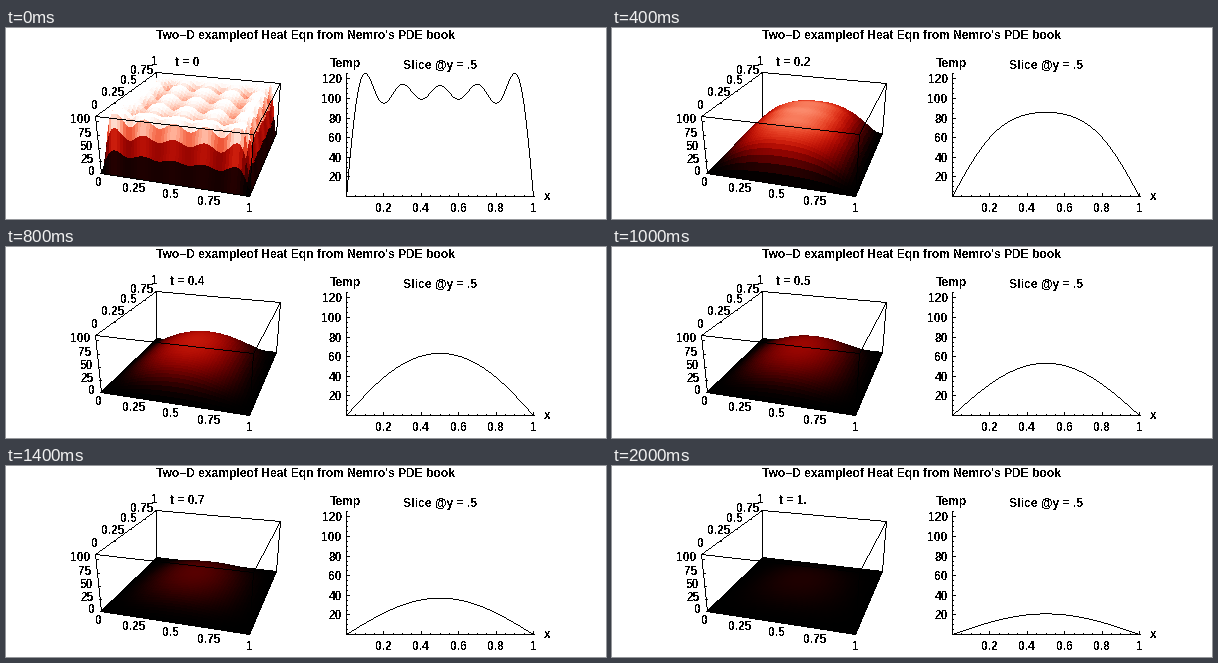
Write a matplotlib script that moves like this. It is 600 px wide and 191 px high and loops after 2100 ms.

```python
from itertools import combinations, product

import numpy as np
import matplotlib.pyplot as plt
from matplotlib.animation import FuncAnimation
from matplotlib.collections import PolyCollection

plt.rcParams.update({"font.family": "Liberation Sans", "font.weight": "bold",
                     "font.size": 8.64, "text.antialiased": False})

W, H, DPI = 600, 191, 100
FRAMES, INTERVAL = 21, 100
Z_TOP = 110
CELLS = 50

fig = plt.figure(figsize=(W / DPI, H / DPI), dpi=DPI, facecolor="white")
ax = fig.add_axes([0, 0, 1, 1])
ax.set_xlim(-0.5, W - 0.5)
ax.set_ylim(H - 0.5, -0.5)
ax.axis("off")


def label(x, y, s, ha="center"):
    return ax.text(x, y + 4, s, ha=ha, va="baseline")


def pixels(xs, ys):
    """Unit squares along a polyline, one per pixel step."""
    xs, ys = np.asarray(xs, float), np.asarray(ys, float)
    step = np.maximum(abs(np.diff(xs)), abs(np.diff(ys)))
    d = np.append(0, np.cumsum(step))
    s = np.linspace(0, d[-1], int(np.ceil(d[-1])) + 1)
    dots = np.floor(np.column_stack([np.interp(s, d, xs), np.interp(s, d, ys)]) + 0.5)
    square = np.array([(-0.5, -0.5), (0.5, -0.5), (0.5, 0.5), (-0.5, 0.5)])
    return dots[:, None] + square


def mesh(verts, z, **kw):
    return ax.add_collection(PolyCollection(verts, linewidths=0, zorder=z, **kw),
                             autolim=False)


def line(xs, ys, z=3):
    return mesh(pixels(xs, ys), z, facecolors="black")


# Temperature: truncated double sine series
odd = np.arange(1, 10, 2)


def series(s, decay):
    return (4 / (np.pi * odd) * decay) @ np.sin(np.pi * np.outer(odd, s))


def heat(x, y, t):
    return 100 * np.outer(series(y, np.exp(-odd * t)),
                          series(x, np.exp(-odd**2 * t)))


def heat_color(v):
    """Black through red and salmon to white for v in 0..1."""
    s = np.sin(np.pi / 2 * v)
    red = np.sin(np.pi / 2 * np.minimum(v / 0.85, 1)) ** 2
    return np.column_stack([red, s**10, s**14])


# Perspective fitted to the corners of the box, in binary order of x, y, z
corners = dict(zip(product((0, 1), repeat=3),
                   [(95, 145), (89, 88), (150, 91), (150, 44),
                    (243, 168), (247, 106), (270, 105), (274, 55)]))


def fit_camera():
    rows, rhs = [], []
    for p, (u, v) in corners.items():
        p = np.array([*p, 1])
        rows.append([*p, 0, 0, 0, 0, *(-u * p[:3])])
        rows.append([0, 0, 0, 0, *p, *(-v * p[:3])])
        rhs += [u, v]
    m = np.linalg.lstsq(np.array(rows, float), np.array(rhs, float), rcond=None)[0]
    return np.append(m, 1).reshape(3, 4)


camera = fit_camera()


def project(x, y, z):
    p = np.stack(np.broadcast_arrays(x, y, z, 1.0), axis=-1) @ camera.T
    return p[..., :2] / p[..., 2:]


# Box: edges meeting the hidden corner lie behind the surface
HIDDEN = (0, 1, 0)
for a, b in combinations(corners, 2):
    if sum(i != j for i, j in zip(a, b)) == 1:
        line(*zip(corners[a], corners[b]), 1 if HIDDEN in (a, b) else 3)

for s in np.linspace(0, 1, 5):
    u, v = project(s, 0, 0)
    label(u - 2 + 2 * s, v + 8 + 4 * s, f"{s:g}")
    u, v = project(0, s, 1)
    label(u - 1, v - 11.5, f"{s:g}")
    line([u, u + 2], [v, v])
    u, v = project(0, 0, 100 * s / Z_TOP)
    label(u - 6, v - 2.5, f"{100 * s:g}", "right")
    line([u, u + 2], [v, v])

# Slice axes
X0, X1, Y0, SCALE = 340, 527, 168, 0.98
line([X0, X1 + 1], [Y0, Y0])
line([X0, X0], [Y0, 45])
for i in range(1, 26):
    major = i % 4 == 0
    size = 3 if major else 1
    y = Y0 - SCALE * 5 * i
    line([X0, X0 + size], [y, y])
    if major:
        label(335.5, y + 0.5, str(5 * i), "right")
    if i <= 20:
        x = X0 + (X1 - X0) * i / 20
        line([x, x], [Y0, Y0 - size])
        if major:
            label(x, 179, f"{i / 20:g}")

label(299, 7, "Two\u2212D exampleof Heat Eqn from Nemro's PDE book")
label(339, 34, "Temp")
label(433.5, 37, "Slice @y = .5")
label(541, 168, "x")

clock = label(180.5, 34, "")
curve = mesh([], 4, facecolors="black")
surface = mesh([], 2, antialiaseds=False)

grid = np.linspace(0, 1, CELLS + 1)
gx, gy = np.meshgrid(grid, grid)
sx = np.linspace(0, 1, 300)


def quads(a):
    """Four corners of every cell, far rows first."""
    q = np.stack([a[:-1, :-1], a[:-1, 1:], a[1:, 1:], a[1:, :-1]], axis=2)
    return q[::-1].reshape(CELLS * CELLS, 4, *a.shape[2:])


def update(i):
    t = i / 20
    z = np.clip(heat(grid, grid, t), 0, Z_TOP) / Z_TOP
    surface.set_verts(quads(project(gx, gy, z)))
    surface.set_facecolor(heat_color(quads(z).mean(axis=1)))
    u = np.minimum(heat(sx, np.array([0.5]), t)[0], 125.5)
    curve.set_verts(pixels(X0 + (X1 - X0) * sx, Y0 - SCALE * u))
    clock.set_text("t = 1." if t == 1 else f"t = {t:g}")
    return surface, curve, clock


anim = FuncAnimation(fig, update, frames=FRAMES, interval=INTERVAL,
                     repeat=True, repeat_delay=0, blit=False)
plt.show()
```
